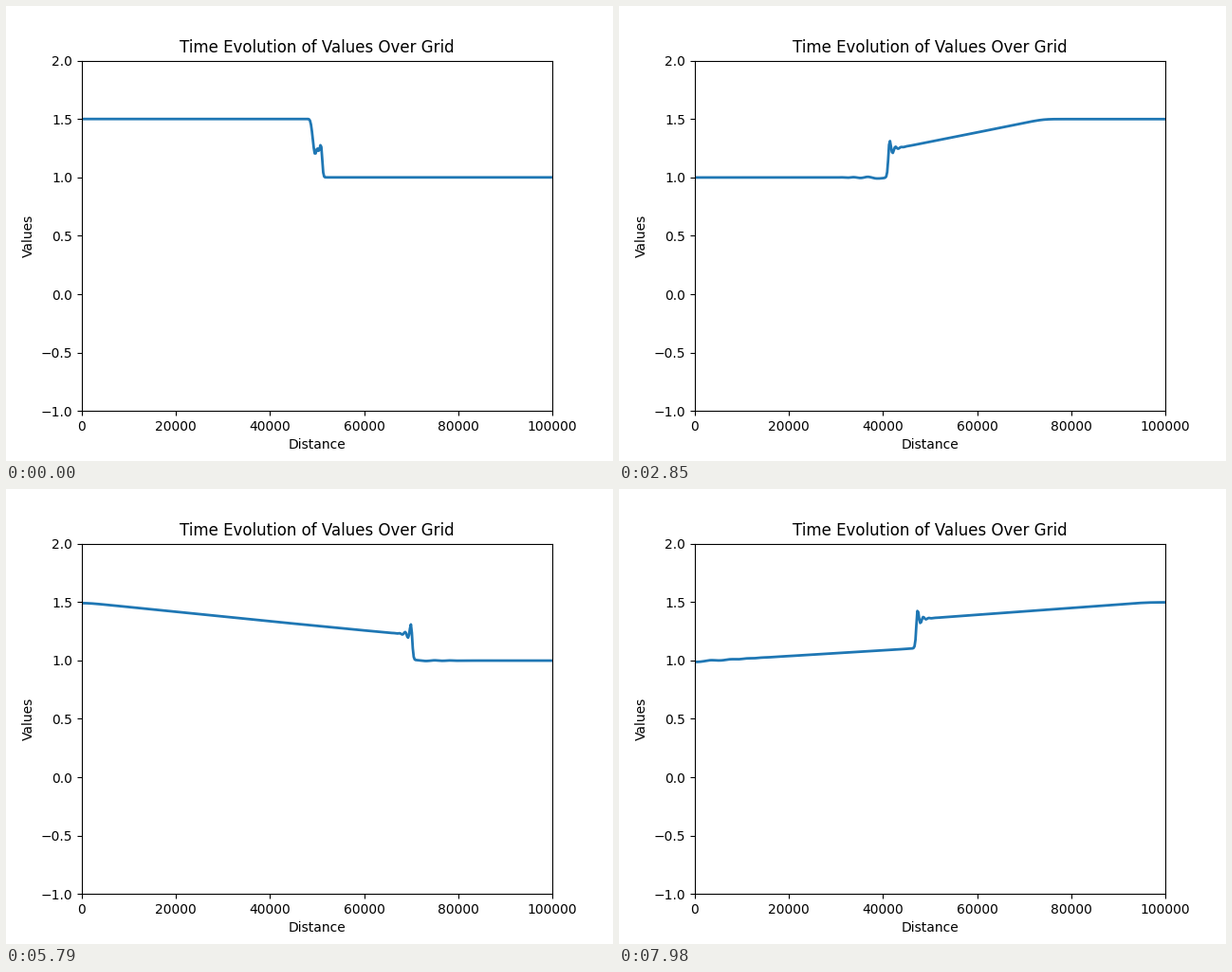
Recreate the animation shown at these times as a matplotlib script. Size 640 by 480 pixels, loop 8 s.

```python
import numpy as np
import matplotlib.pyplot as plt
from matplotlib.animation import FuncAnimation

# Shallow-water dam break between two walls, two-step Lax-Wendroff scheme
G = 9.81
LENGTH = 100_000
CELLS = 500
CFL = 0.7
STEPS_PER_FRAME = 10
FRAMES = 267
LOOP_MS = 8000

x = np.linspace(0, LENGTH, CELLS)
dx = x[1] - x[0]


def flux(h, q):
    return q, q * q / h + G * h * h / 2


def step(h, q):
    dt = CFL * dx / np.max(np.abs(q / h) + np.sqrt(G * h))
    r = dt / dx
    fh, fq = flux(h, q)
    h_mid = (h[1:] + h[:-1]) / 2 - r / 2 * np.diff(fh)
    q_mid = (q[1:] + q[:-1]) / 2 - r / 2 * np.diff(fq)
    fh, fq = flux(h_mid, q_mid)
    h, q = h.copy(), q.copy()
    h[1:-1] -= r * np.diff(fh)
    q[1:-1] -= r * np.diff(fq)
    # solid walls
    h[0], h[-1] = h[1], h[-2]
    q[0] = q[-1] = 0
    return h, q


def simulate():
    h = np.where(x < LENGTH / 2, 1.5, 1.0)
    q = np.zeros(CELLS)
    levels = []
    for _ in range(FRAMES):
        for _ in range(STEPS_PER_FRAME):
            h, q = step(h, q)
        levels.append(h)
    return levels


levels = simulate()

fig, ax = plt.subplots(figsize=(6.4, 4.8), dpi=100)
line, = ax.plot(x, levels[0], color="#1f77b4", lw=2)
ax.set_xlim(0, LENGTH)
ax.set_ylim(-1, 2)
ax.set_title("Time Evolution of Values Over Grid")
ax.set_xlabel("Distance")
ax.set_ylabel("Values")


def update(i):
    line.set_ydata(levels[i])
    return line,


anim = FuncAnimation(fig, update, frames=FRAMES, interval=LOOP_MS / FRAMES,
                     repeat=True, repeat_delay=0, blit=False)
plt.show()
```
